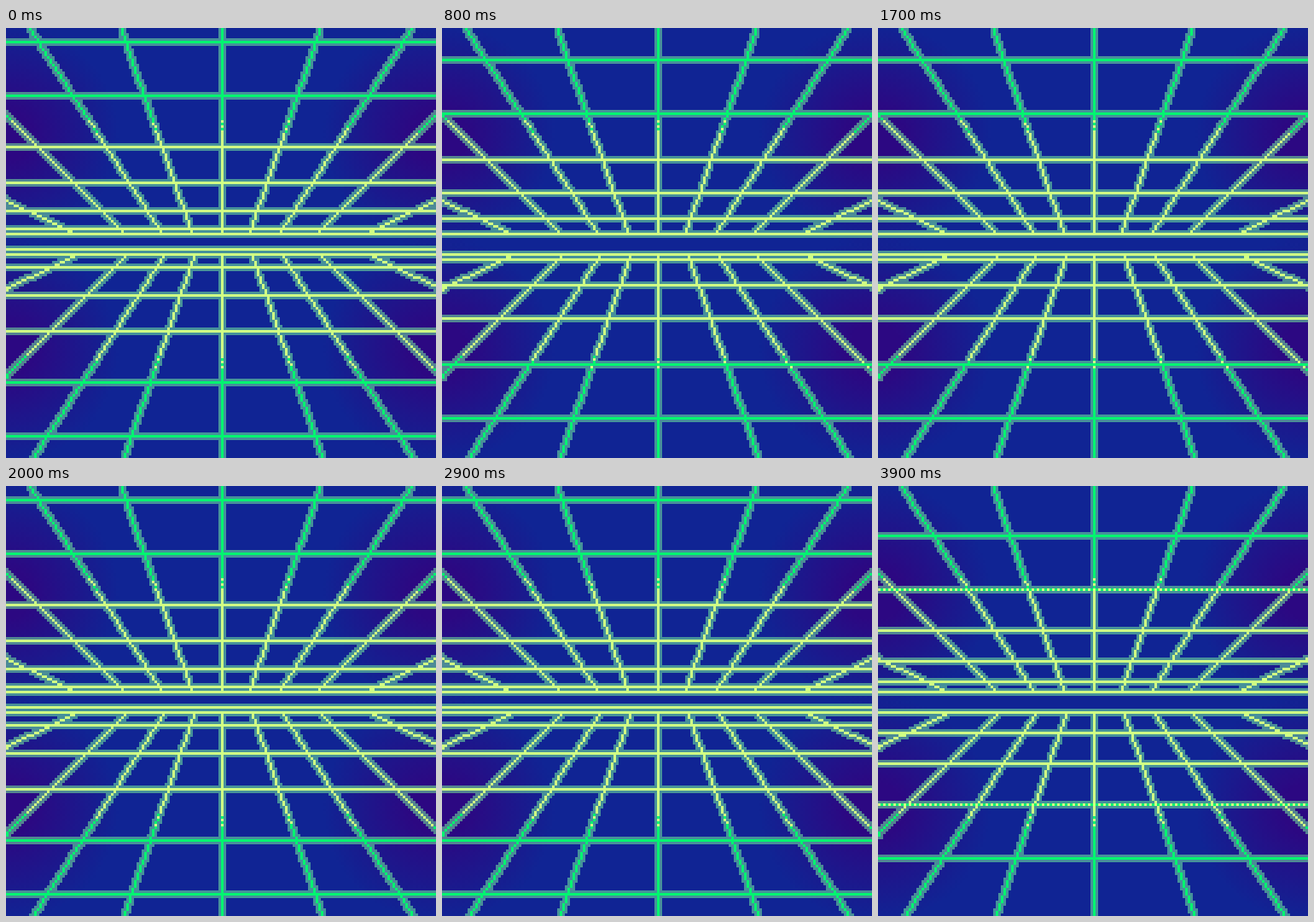
Animation, 504 px wide and 504 px high, one loop 4000 ms. Source, as an HTML page with a canvas:

```html
<!DOCTYPE html>
<html>
<head>
<meta charset="utf-8">
<title>Neon grid</title>
<style>
  html, body { margin: 0; width: 100%; height: 100%; overflow: hidden; background: #102494; }
  canvas { display: block; width: 504px; height: 504px; image-rendering: pixelated; }
</style>
</head>
<body>
<canvas id="stage" width="168" height="168"></canvas>
<script>
const SIZE = 168, LAST = SIZE - 1, CENTER = 84, BAR_AXIS = 82;
const HORIZONS = [80, 88];
const BLUE = '#102494', GREEN = '#00f570', PALE = '#d0ff84', HALO = 'rgba(124, 254, 162, 0.5)';
const ctx = document.getElementById('stage').getContext('2d');

// A bar's distance from the axis after each full cycle of three poses
const barPath = [4, 11, 22, 36, 56, 77];

// Offset of each ray at the horizon, and its sideways run per row
const fan = [[11.5, 0.348], [23.5, 0.646], [38.5, 1], [58.5, 2.08]];

function linePoints(x0, y0, x1, y1) {
  const steps = Math.ceil(Math.max(Math.abs(x1 - x0), Math.abs(y1 - y0)));
  return Array.from({ length: steps + 1 }, (_, i) => [
    Math.round(x0 + (x1 - x0) * i / steps),
    Math.round(y0 + (y1 - y0) * i / steps)
  ]);
}

function rayPoints() {
  const points = HORIZONS.flatMap((y, i) => linePoints(CENTER, y, CENTER, i * LAST));
  for (const below of [-1, 1]) {
    const axis = CENTER + below / 2, startY = CENTER + 5 * below;
    for (const side of [-1, 1]) {
      for (const [offset, slope] of fan) {
        const rows = Math.min(79, (85 - offset) / slope);
        points.push(...linePoints(axis + side * offset, startY,
          axis + side * (offset + slope * rows), startY + below * rows));
      }
    }
  }
  return points.map(([x, y]) => [x, y, Math.abs(y - CENTER) - 2]);
}

function barPoints(pose) {
  const rows = [...HORIZONS];
  for (let i = 0; i + pose / 3 < barPath.length - 1 + 0.01; i++) {
    const from = barPath[i], to = barPath[i + 1] ?? from;
    const distance = Math.floor(from + (to - from) * pose / 3);
    rows.push(BAR_AXIS - distance, BAR_AXIS + distance);
  }
  return rows.flatMap(y => linePoints(0, y, LAST, y))
    .map(([x, y]) => [x, y, Math.abs(y - BAR_AXIS)]);
}

function drawBackground() {
  ctx.fillStyle = BLUE;
  ctx.fillRect(0, 0, SIZE, SIZE);
  for (const x of [0, SIZE]) {
    for (const y of [CENTER - 42, CENTER + 42]) {
      const glow = ctx.createRadialGradient(x, y, 10, x, y, 44);
      glow.addColorStop(0, 'rgb(44, 8, 130)');
      glow.addColorStop(1, 'rgba(44, 8, 130, 0)');
      ctx.fillStyle = glow;
      ctx.fillRect(0, 0, SIZE, SIZE);
    }
  }
}

// Lines are pale near the horizon and green far out, with a speckled seam
function coreColor(x, y, distance) {
  const seam = distance <= 46 && (x + y) % 2 === 0;
  return distance < 42 || seam ? PALE : GREEN;
}

const rays = rayPoints();

function draw(pose) {
  const points = [...rays, ...barPoints(pose)];
  drawBackground();
  ctx.beginPath();
  for (const [x, y] of points) ctx.rect(x - 1, y - 1, 3, 3);
  ctx.fillStyle = HALO;
  ctx.fill();
  for (const [x, y, distance] of points) {
    ctx.fillStyle = coreColor(x, y, distance);
    ctx.fillRect(x, y, 1, 1);
  }
}

let shown = -1;
function tick() {
  const step = Math.floor(performance.now() % 4000 / 100);
  const pose = Math.floor(step * 42 / 40) % 3;
  if (pose !== shown) draw(shown = pose);
  requestAnimationFrame(tick);
}
tick();
</script>
</body>
</html>
```
